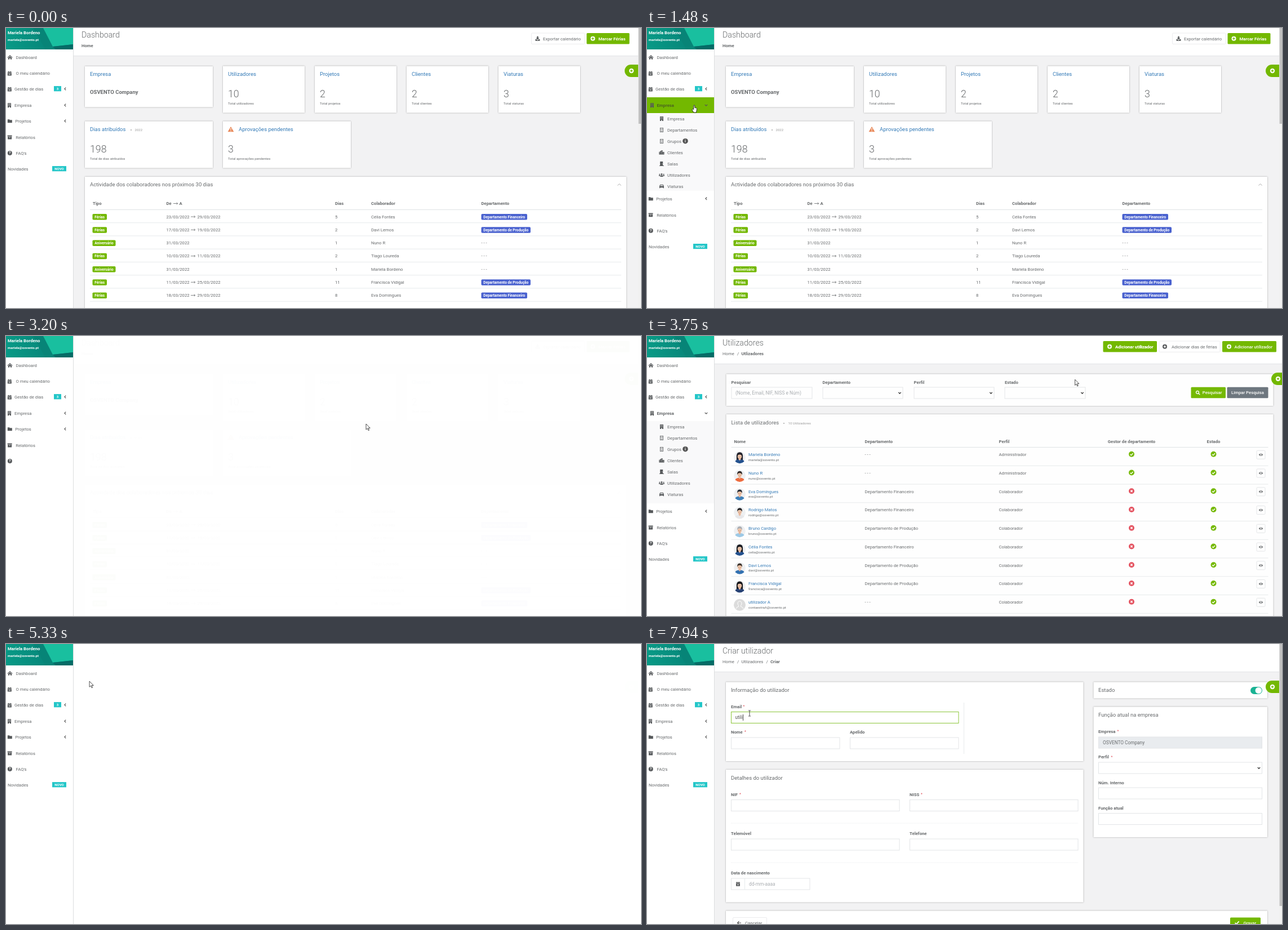
Write an HTML page that moves like this. It is 1127 by 497 pixels and loops after 8 s.

```html
<!DOCTYPE html>
<html lang="pt">
<head>
<meta charset="utf-8">
<title>Gestão de utilizadores</title>
<style>
html, body { margin: 0; width: 100%; height: 100%; overflow: hidden; background: #fff; }
svg { display: block; width: 100%; height: 100%; font-family: Roboto, Arial, sans-serif; }
.card { fill: #fff; filter: drop-shadow(0 .8px .8px rgba(0,0,0,.36)); }
</style>
</head>
<body>
<svg id="stage" viewBox="0 0 1127 497"></svg>
<script>
const GREEN = '#73b800', TEAL = '#23c6c8', BLUE = '#337ab7', GRAY = '#676a6c', LINE = '#e7eaec';
const HOVER_TEXT = '#4c6420', BG = '#f2f2f3', LOOP = 8000;

// ---- drawing helpers: text y is the middle of the capitals ----
const text = (x, y, s, o = {}) => {
  const size = o.size || 7.74;
  return `<text x="${x}" y="${y + size * .355}" font-size="${size}" fill="${o.fill || GRAY}" font-weight="${o.w || 400}" text-anchor="${o.anchor || 'start'}">${s}</text>`;
};
const bold = (x, y, s, o = {}) => text(x, y, s, { w: 700, ...o });
const head = (x, y, s, o = {}) => text(x, y, s, { size: 9.5, ...o });
const rect = (x, y, w, h, fill, extra = '') => `<rect x="${x}" y="${y}" width="${w}" height="${h}" fill="${fill}" ${extra}/>`;
const card = (x, y, x2, y2) => `<rect class="card" x="${x}" y="${y}" width="${x2 - x}" height="${y2 - y}"/>`;
const line = (x, y, x2, y2, c = LINE, w = 1, extra = '') => `<path d="M${x} ${y}L${x2} ${y2}" stroke="${c}" stroke-width="${w}" ${extra}/>`;
const stroke = (x, y, d, c, w = 1.2) => `<path transform="translate(${x} ${y})" d="${d}" fill="none" stroke="${c}" stroke-width="${w}"/>`;
const circle = (x, y, r, fill) => `<circle cx="${x}" cy="${y}" r="${r}" fill="${fill}"/>`;
const group = (id, body) => `<g id="${id}">${body}</g>`;

const ICONS = {
  home: 'M-4.6.2L0-3.9L4.6.2L4 1L0-2.6L-4 1ZM-3.1 1.1L0-1.7L3.1 1.1V3.8H.9V1.5H-.9V3.8H-3.1Z',
  cal: 'M-3.5-3H-2.3V-4H-1.1V-3H1.1V-4H2.3V-3H3.5V-1.6H-3.5ZM-3.5-1.1H3.5V3.8H-3.5ZM-1.7.8V1.8H1.7V.8Z',
  building: 'M-3-4H3V4H.8V2.2H-.8V4H-3ZM-1.8-2.9V-1.7H-.6V-2.9ZM.6-2.9V-1.7H1.8V-2.9ZM-1.8-.6V.6H-.6V-.6ZM.6-.6V.6H1.8V-.6Z',
  outline: 'M-3-4H3V4H-3ZM-2.2-3.2V3.2H2.2V-3.2ZM-1.4-2.3H-.4V-1.3H-1.4ZM.4-2.3H1.4V-1.3H.4ZM-1.4-.5H-.4V.5H-1.4ZM.4-.5H1.4V.5H.4ZM-.6 1.4H.6V3.5H-.6Z',
  folder: 'M-4-3H-.8L.2-2H4V3H-4Z',
  archive: 'M-4-3.4H4V-1.5H-4ZM-3.5-1H3.5V3.4H-3.5ZM-1.2-.2V.6H1.2V-.2Z',
  city: 'M-4.6-1.2H-2.4V-3H-.6V-4H1.6V-1H4.6V3.6H-4.6ZM-3.6.2V1.2H-2.6V.2ZM-.6-2.4V-1.4H.6V-2.4ZM-.6.2V1.2H.6V.2ZM2.5.4V1.4H3.5V.4Z',
  door: 'M-2.8-4H2.2V3H4V4H-4V3H-2.8ZM.6-.5V.6H1.4V-.5Z',
  users: 'M-1.5-1.6a1.5 1.5 0 1 0 3 0a1.5 1.5 0 1 0-3 0ZM-2.6 3V1.7Q-2.6.5-1.4.5H1.4Q2.6.5 2.6 1.7V3ZM-4.6-1.3a1 1 0 1 0 2 0a1 1 0 1 0-2 0ZM2.6-1.3a1 1 0 1 0 2 0a1 1 0 1 0-2 0ZM-5 1.7V.8Q-5 .1-4.3.1H-2.4L-3.2 1.7ZM5 1.7V.8Q5 .1 4.3.1H2.4L3.2 1.7Z',
  car: 'M-4-.2L-2.8-3H2.8L4-.2V3.3H2.6V2.2H-2.6V3.3H-4ZM-2.8-.4H2.8L2.1-2H-2.1Z',
  down: 'M-1.2-4H1.2V-1H3L0 2L-3-1H-1.2ZM-4 1.4H-2L0 3.2L2 1.4H4V4H-4Z',
  warn: 'M0-4.8L5.4 4.6H-5.4ZM-.7-1.8L-.4 1.6H.4L.7-1.8ZM-.6 2.3V3.5H.6V2.3Z',
  eye: 'M-3.7 0Q0-4.6 3.7 0Q0 4.6-3.7 0ZM-1.7 0a1.7 1.7 0 1 0 3.4 0a1.7 1.7 0 1 0-3.4 0ZM-.8 0a.8.8 0 1 0 1.6 0a.8.8 0 1 0-1.6 0Z'
};
const icon = (name, x, y, c = '#55585a') => `<path transform="translate(${x} ${y})" d="${ICONS[name]}" fill="${c}" fill-rule="evenodd"/>`;
const plus = (x, y, c, ink, r = 4) => circle(x, y, r, c) + stroke(x, y, `M${-r * .55} 0H${r * .55}M0 ${-r * .55}V${r * .55}`, ink, 1.3);
const check = (x, y) => circle(x, y, 5, GREEN) + stroke(x, y, 'M-2.5.1L-.7 1.9L2.6-1.5', '#fff', 1.4);
const cross = (x, y) => circle(x, y, 5, '#e4515f') + stroke(x, y, 'M-1.7-1.7L1.7 1.7M1.7-1.7L-1.7 1.7', '#fff', 1.4);
const left = (y, c) => stroke(105, y, 'M1.2-2.3L-1.1 0L1.2 2.3', c);
const arrow = (x, y) => stroke(x, y, 'M0 0H7.6M5.6-1.8L7.8 0L5.6 1.8', GRAY, .8);
const badge = (x, y, w, s, c) => rect(x, y - 5.4, w, 10.6, c, 'rx="1.8"') + bold(x + w / 2, y - .1, s, { size: 6.5, fill: '#fff', anchor: 'middle' });
const tag = (x, y, w, s) => rect(x, y - 4.6, w, 9.2, TEAL) + bold(x + w / 2, y, s, { size: 6.1, fill: '#fff', anchor: 'middle' });
const input = (x, y, x2, o = {}) => rect(x + .5, y + .5, x2 - x - 1, 20, o.fill || '#fff', `stroke="#e3e5e7" ${o.id ? `id="${o.id}"` : ''}`) +
  (o.select ? stroke(x2 - 6, y + 10.6, 'M-2.2-1.2L0 1.2L2.2-1.2', '#333', 1.3) : '');
const label = (x, y, s, star) => bold(x, y, s) + (star ? text(star, y - .4, '*', { size: 6.5, fill: '#e0505a' }) : '');

// ---- sidebar ----
const menuRow = (ic, ix, x, y, s) => icon(ic, ix, y) + text(x, y, s);
const SUB = [['building', 'Empresa'], ['outline', 'Departamentos'], ['outline', 'Grupos'], ['city', 'Clientes'], ['door', 'Salas'], ['users', 'Utilizadores'], ['car', 'Viaturas']];

const banner = `<defs><linearGradient id="teal" x2="1"><stop stop-color="#089a86"/><stop offset="1" stop-color="#067a72"/></linearGradient></defs>` +
  rect(0, 0, 119, 38, 'url(#teal)') +
  '<path d="M48 0H68L84 33L70 38Z" fill="#078477"/><path d="M66 0H119V29L83 33Z" fill="#19bf9f"/><path d="M83 33L119 29V38H88Z" fill="#056b66"/>' +
  bold(3, 8, 'Mariela Bordeno', { fill: '#fff' }) + bold(3, 20.5, 'mariela@osvento.pt', { size: 6.1, fill: '#fff' });

const sidebar = rect(0, 0, 119, 497, '#fff') +
  menuRow('home', 7, 17.5, 52, 'Dashboard') + menuRow('cal', 6.3, 17.5, 80.7, 'O meu calendário') +
  menuRow('cal', 6.3, 15, 108.7, 'Gestão de dias') + tag(85, 107.7, 13, '3') + left(108, '#555') +
  group('sub', rect(0, 151, 119, 146, '#f9f9fa') + rect(0, 0, 119, 20, GREEN, 'id="subHover"') +
    SUB.map(([ic, s], i) => icon(ic, 26, 161 + i * 20) + text(36, 161 + i * 20, s)).join('') +
    circle(68, 200.7, 4.8, '#555') + bold(68, 200.7, 'i', { size: 7, fill: '#fff', anchor: 'middle' })) +
  rect(0, 123, 119, 28, '#fff') + rect(0, 123, 119, 28, GREEN, 'id="rowHover"') +
  group('rowClosed', menuRow('building', 6, 15, 137.2, 'Empresa') + left(137, '#555')) +
  group('rowOpen', icon('building', 9, 137.2) + bold(17.5, 137.2, 'Empresa') + stroke(105, 137, 'M-2.3-1.2L0 1.1L2.3-1.2', '#555')) +
  group('lower', rect(0, 151, 119, 346, '#fff') + menuRow('folder', 6.8, 16.2, 165.3, 'Projetos') + left(165, '#555') +
    menuRow('archive', 6.6, 17.2, 194, 'Relatórios') + circle(6.8, 222, 4, '#55585a') + bold(6.8, 222, '?', { size: 6.5, fill: '#fff', anchor: 'middle' }) +
    group('tail', text(17.5, 222, "FAQ's") + text(3, 250.5, 'Novidades') + tag(82, 249.7, 25, 'NOVO'))) +
  banner + line(119.5, 0, 119.5, 497, '#dcdedf');

// ---- page frame ----
const crumbs = parts => parts.map(([x, s], i) => (i ? text(x - 7.5, 31.3, '/') : '') + text(x, 31.3, s, { w: i == parts.length - 1 ? 700 : 400 })).join('');
const topBar = (title, parts) => rect(120, 0, 1007, 497, BG) + rect(120, 0, 1007, 49, '#fff') + line(120, 49.5, 1127, 49.5, '#e2e4e6') +
  head(134, 11.5, title, { size: 14.2, w: 300 }) + crumbs(parts);
const plusTab = (x, end) => `<path d="M${end} 65H${x + 11}a11 11 0 0 0 0 22H${end}Z" fill="${GREEN}"/>` + plus(x + 12, 76, '#fff', GREEN, 4.2);
const scrollbar = h => rect(1122, 0, 5, 497, '#f1f1f1') + rect(1122.6, 0, 4.4, h, '#c1c1c1');
const button = (x, x2, y, s, tx, fill, ink = '#fff', w = 500) => rect(x, y, x2 - x, 19.5, fill, `rx="1.5" ${fill == '#fff' ? 'stroke="#ececee"' : ''}`) + text(tx, y + 9.8, s, { fill: ink, w });

// ---- dashboard ----
const counter = (x, y, x2, title, n, sub, tx = x + 9) => card(x, y, x2, y + 83) + head(tx, y + 14.3, title, { fill: BLUE }) +
  text(x + 9, y + 49, n, { size: 17.8, w: 300 }) + text(x + 9, y + 66, sub, { size: 6 });
const EVENTS = [
  ['Férias', '23/03/2022', '29/03/2022', 5, 'Célia Fontes', 'Financeiro'],
  ['Férias', '17/03/2022', '19/03/2022', 2, 'Davi Lemos', 'de Produção'],
  ['Aniversário', '31/03/2022', '', 1, 'Nuno R'],
  ['Férias', '10/03/2022', '11/03/2022', 2, 'Tiago Loureda'],
  ['Aniversário', '31/03/2022', '', 1, 'Mariela Bordeno'],
  ['Férias', '11/03/2022', '25/03/2022', 11, 'Francisca Vidigal', 'de Produção'],
  ['Férias', '18/03/2022', '29/03/2022', 8, 'Eva Domingues', 'Financeiro']
];
const eventRow = ([type, from, to, days, who, dept], i) => {
  const y = 335 + i * 23.25;
  return badge(153.5, y + .4, type == 'Férias' ? 25.5 : 41, type, GREEN) + text(284.5, y, from) +
    (to ? arrow(328, y) + text(339.5, y, to) : '') + text(584, y, days) + text(648, y, who) +
    (dept ? badge(843.5, y + .4, dept == 'Financeiro' ? 81.5 : 87.5, 'Departamento ' + dept, '#4a62cf') : text(843.5, y, '- - -')) +
    line(149, y + 10.7, 1092, y + 10.7);
};
const dashboard = topBar('Dashboard', [[134, 'Home']]) +
  button(932.5, 1027, 9, 'Exportar calendário', 953, '#fff', GRAY, 400) + icon('down', 943.5, 18.7) +
  button(1030.5, 1106.5, 9, 'Marcar Férias', 1051.5, GREEN, '#fff', 700) + plus(1041.5, 18.7, '#fff', GREEN) +
  card(140, 68, 367, 140.5) + head(149, 82, 'Empresa', { fill: BLUE }) + head(149, 114, 'OSVENTO Company', { w: 700 }) +
  counter(385, 67.5, 530, 'Utilizadores', 10, 'Total utilizadores') + counter(548, 67.5, 693, 'Projetos', 2, 'Total projetos') +
  counter(711, 67.5, 856, 'Clientes', 2, 'Total clientes') + counter(874, 67.5, 1019, 'Viaturas', 3, 'Total viaturas') +
  counter(140, 165.5, 367, 'Dias atribuídos', 198, 'Total de dias atribuídos') + circle(222, 181, .9, '#999') + text(228.5, 181, '2022', { size: 6.1, fill: '#999' }) +
  counter(385, 165.5, 612, 'Aprovações pendentes', 3, 'Total aprovações pendentes', 413) + icon('warn', 399, 179.7, '#e8895a') +
  card(140, 264, 1101, 510) + head(149, 278, 'Actividade dos colaboradores nos próximos 30 dias') + stroke(1088.5, 278, 'M-3 1.6L0-1.4L3 1.6', '#aaa', 1) +
  bold(154, 311.5, 'Tipo') + bold(284.5, 311.5, 'De') + arrow(297, 311.5) + bold(307.5, 311.5, 'A') + bold(584, 311.5, 'Dias') +
  bold(648, 311.5, 'Colaborador') + bold(843.5, 311.5, 'Departamento') + line(149, 322.5, 1092, 322.5, '#dfe2e4') +
  EVENTS.map(eventRow).join('') + plusTab(1098, 1122) + scrollbar(170);

// ---- user list: name, mailbox, department, hair, shirt, long hair ----
const USERS = [
  ['Mariela Bordeno', 'mariela', '', '#20202a', '#1f4e8c', 1],
  ['Nuno R', 'nuno', '', '#2b2422', '#ee6a3c', 0],
  ['Eva Domingues', 'eva', 'Financeiro', '#262a33', '#3d7fb8', 0],
  ['Rodrigo Matos', 'rodrigo', 'Financeiro', '#1f1f22', '#e8e8ea', 0],
  ['Bruno Cardigo', 'bruno', 'de Produção', '#a9adb3', '#9cc9e6', 0],
  ['Célia Fontes', 'celia', 'Financeiro', '#17191f', '#1f4e8c', 1],
  ['Davi Lemos', 'davi', 'de Produção', '#3a3029', '#2f6fb0', 0],
  ['Francisca Vidigal', 'francisca', 'de Produção', '#16161a', '#233f73', 1],
  ['utilizador A', 'contaextraA', '']
];
const avatar = (hair, shirt, long) => hair
  ? circle(0, 0, 10.3, '#eef0f2') + (long ? `<path d="M-5.6 5V-3Q-5-9 0-9T5.6-3V5Z" fill="${hair}"/>` : '') +
    `<path d="M-8 7.5Q-7 4-2 3.6H2Q7 4 8 7.5Q4 11 0 11T-8 7.5Z" fill="${shirt}"/><path d="M-1.8 1H1.8V4L0 6L-1.8 4Z" fill="#e9b698"/>` +
    `<ellipse cy="-1.6" rx="3.7" ry="4.6" fill="#f3c8ab"/><path d="M-4.4-1.5Q-5-8.2 0-8.4T4.4-1.5Q3.4-4.8 0-4.9T-4.4-1.5Z" fill="${hair}"/>` +
    circle(-1.5, -1.4, .5, '#333') + circle(1.5, -1.4, .5, '#333') + stroke(0, 0, 'M-1.1 1.2Q0 1.9 1.1 1.2', '#a55', .6)
  : circle(0, 0, 10.5, '#dcdcdc') + stroke(0, 0, 'M-6.5 7Q-6 3.6-2 3V1.3Q-4-1-3.4-4Q-2.6-6.6 0-6.6T3.4-4Q4-1 2 1.3V3Q6 3.6 6.5 7', '#fff', 1);
const userRow = ([name, mail, dept, hair, shirt, long], i) => {
  const y = 210.3 + i * 32.75, admin = i < 2;
  return `<g transform="translate(164 ${y + 5})">${avatar(hair, shirt, long)}</g>` + text(179.5, y, name, { fill: BLUE }) +
    text(179.5, y + 9.3, mail + '@osvento.pt', { size: 6.1 }) + text(386, y, dept ? 'Departamento ' + dept : '- - -') +
    text(624, y, admin ? 'Administrador' : 'Colaborador') + (admin ? check : cross)(859.5, y - .5) + check(1005, y - .5) +
    rect(1081.5, y - 7, 15, 15, '#fff', 'rx="1.5" stroke="#e3e5e7"') + icon('eye', 1089, y + .5) + line(149, y + 20, 1102, y + 20);
};
const list = topBar('Utilizadores', [[134, 'Home'], [167.5, 'Utlizadores']]) +
  button(809.5, 905, 9, 'Adicionar utilizador', 831, GREEN) + rect(809.5, 9, 95.5, 19.5, '#a8ff24', 'rx="1.5" id="glow"') +
  text(831, 18.8, 'Adicionar utilizador', { fill: '#fff', w: 500 }) + plus(821, 18.8, '#fff', GREEN) +
  button(909, 1017, 9, 'Adicionar dias de férias', 931, '#fff', GRAY, 400) + plus(919, 18.8, '#55585a', '#fff') +
  button(1021, 1117, 9, 'Adicionar utilizador', 1042.5, GREEN) + plus(1033, 18.8, '#fff', GREEN) +
  group('listBody', card(140, 67.5, 1111, 124) + label(149, 82, 'Pesquisar') + label(311, 82, 'Departamento') + label(473, 82, 'Perfil') + label(634.5, 82, 'Estado') +
    input(149, 90.5, 293) + text(156.5, 101, '(Nome, Email, NIF, NISS e Núm)', { size: 8.4, fill: '#a9adb1' }) +
    [[311, 454], [473, 616], [634, 778]].map(([a, b]) => input(a, 90.5, b, { select: 1 })).join('') +
    button(965, 1026.5, 90.8, 'Pesquisar', 985.3, GREEN) + stroke(977, 100, 'M2 0A2.5 2.5 0 1 1 2-.01M1.3 1.8L3.8 4.2', '#fff', 1.4) +
    button(1029, 1102, 90.8, 'Limpar Pesquisa', 1036.5, '#6c757d') +
    card(140, 139, 1111, 510) + head(149, 154, 'Lista de utilizadores') + circle(242.5, 155, .9, '#999') + text(250, 155, '10 Utilizadores', { size: 6.1, fill: '#999' }) +
    bold(154, 187, 'Nome') + bold(386, 187, 'Departamento') + bold(624, 187, 'Perfil') +
    bold(859.5, 187, 'Gestor de departamento', { anchor: 'middle' }) + bold(1005, 187, 'Estado', { anchor: 'middle' }) +
    line(149, 197.6, 1102, 197.6, '#dfe2e4') + USERS.map(userRow).join('')) + plusTab(1108, 1127);

// ---- new user form ----
const dashes = y => line(149, y, 765, y, LINE, .8, 'stroke-dasharray="1.5 1"');
const form = topBar('Criar utilizador', [[134, 'Home'], [167.5, 'Utlizadores'], [219, 'Criar']]) +
  group('formBody', card(140, 67.5, 774.5, 208) + head(149, 82, 'Informação do utilizador') + label(149, 111.3, 'Email', 170.5) +
    input(149, 120, 553.5, { id: 'email' }) + label(149, 156.5, 'Nome', 173) + input(149, 165.5, 342.5) +
    label(360, 156.5, 'Apelido') + input(360, 165.5, 553.5) + line(562.5, 104, 562.5, 195) +
    card(140, 223, 774.5, 458.5) + head(149, 237.5, 'Detalhes do utilizador') +
    label(149, 267, 'NIF', 164) + input(149, 276, 448.5) + label(466, 267, 'NISS', 486) + input(466, 276, 765.5) + dashes(318) +
    label(149, 336.7, 'Telemóvel') + input(149, 345.5, 448.5) + label(466, 336.7, 'Telefone') + input(466, 345.5, 765.5) + dashes(388) +
    label(149, 406.5, 'Data de nascimento') + input(149, 415.5, 289.5) + line(173.5, 416, 173.5, 436) + icon('cal', 161.5, 426) +
    text(181, 426, 'dd-mm-aaaa', { size: 8.3, fill: '#a9adb1' }) +
    card(792.5, 67.5, 1101, 96.5) + head(801, 82, 'Estado') + rect(1071, 76, 21, 13, '#1ab394', 'rx="6.5"') + circle(1085.3, 82.5, 5.7, '#fff') +
    card(792.5, 111.5, 1101, 343) + head(801, 126, 'Função atual na empresa') + label(801, 155.5, 'Empresa', 834.5) +
    input(801, 164.5, 1092, { fill: '#e9ecef' }) + text(809, 175, 'OSVENTO Company', { size: 8.3 }) +
    label(801, 200.7, 'Perfil', 823.5) + input(801, 209.5, 1092, { select: 1 }) + label(801, 246, 'Núm. Interno') + input(801, 254.5, 1092) +
    label(801, 291.3, 'Função atual') + input(801, 300, 1092) +
    card(140, 473.5, 1101, 520) + button(152.5, 212.5, 485.5, 'Cancelar', 174, '#fff', GRAY, 400) + stroke(163.5, 495, 'M3.5 0H-3M0-3L-3 0L0 3', '#555', 1.1) +
    button(1035, 1089, 485.5, 'Gravar', 1058.5, GREEN) + stroke(1047, 494.8, 'M-3.4 0L-1 2.5L3.6-2.4', '#fff', 1.7) +
    `<text id="typed" x="156.5" y="133" font-size="8.3" fill="#555"></text>` + rect(0, 125, .9, 11, '#333', 'id="caret"')) +
  plusTab(1098, 1122) + scrollbar(465);

const CURSORS = {
  pointer: '<path d="M0 0V10.2L2.4 8L4.1 11.8L5.6 11.1L4 7.4H7.2Z" fill="#fff" stroke="#222" stroke-width=".8"/>',
  hand: '<path d="M-1.2 7.6V1Q-1.2 0-.2 0T.8 1V4.4L3.6 5Q4.6 5.3 4.5 6.4L4 10.2L3.4 13H-1.2L-3.8 8.6Q-4.2 7.2-2.8 6.8Z" fill="#fff" stroke="#222" stroke-width=".9"/>',
  beam: '<path d="M-2-5H-.6L0-4.5L.6-5H2M0-4.5V4.5M-2 5H-.6L0 4.5L.6 5H2" fill="none" stroke="#333" stroke-width=".9"/>'
};
const stage = document.getElementById('stage');
stage.innerHTML = group('dash', dashboard) + group('list', list) + group('form', form) + sidebar +
  group('cursor', Object.entries(CURSORS).map(([k, v]) => group(k, v)).join(''));
const el = {};
stage.querySelectorAll('[id]').forEach(n => el[n.id] = n);

// ---- motion ----
const PATH = [
  [130, 1085, 400], [210, 900, 352], [370, 400, 222], [530, 98, 143], [610, 84, 137], [1500, 84, 137], [1870, 82, 233], [1960, 82, 239],
  [2039, 82, 240], [2040, 82, 254], [2280, 82, 256], [2490, 82, 259], [2890, 82, 259], [3200, 639, 156], [3360, 639, 156],
  [4070, 858, 13], [4770, 858, 13], [4780, 500, 42], [4850, 148, 66], [5330, 148, 66], [5880, 180, 114.5], [6110, 182, 123]
];
const OPEN = [[1160, 0], [1500, 1]];
const FADES = {
  dash: [[2880, 1], [2890, .75], [3200, .012], [3359, .012], [3360, 0]],
  list: [[3360, 0], [3600, 1], [4850, 1], [4939, 1], [4940, .3], [5030, .012], [5329, .012], [5330, 0]],
  form: [[5330, 0], [5570, 1]]
};
const KEYS = [6970, 7220, 7390, 7630, 7940];

const at = (table, t, k = 1) => {
  const i = table.findIndex(p => p[0] > t);
  if (i < 0) return table[table.length - 1][k];
  if (!i) return table[0][k];
  const a = table[i - 1], b = table[i];
  return a[k] + (b[k] - a[k]) * (t - a[0]) / (b[0] - a[0]);
};
const ramp = (t, a, b) => Math.min(1, Math.max(0, (t - a) / (b - a)));
const show = (node, on) => node.style.display = on ? '' : 'none';
const enter = (node, t, a, b) => {
  const p = 1 - (1 - ramp(t, a, b)) ** 3;
  node.setAttribute('transform', `translate(${24 * (1 - p)} 0)`);
  node.style.opacity = p;
};

function draw(t) {
  for (const id in FADES) {
    const o = at(FADES[id], t);
    show(el[id], o > 0);
    el[id].style.opacity = o;
  }
  enter(el.listBody, t, 3360, 3900);
  enter(el.formBody, t, 5330, 5800);
  el.glow.style.opacity = ramp(t, 4300, 4550);

  // sidebar
  const x = at(PATH, t), y = at(PATH, t, 2);
  const expanded = (t >= 1160 && t < 2970) || (t >= 3360 && t < 4940);
  const loading = (t >= 2970 && t < 3360) || (t >= 4940 && t < 5330);
  const overMenu = t >= 130 && x < 119;
  const item = Math.floor((y - 151) / 20);
  show(el.sub, expanded);
  show(el.rowOpen, expanded);
  show(el.rowClosed, !expanded);
  show(el.tail, !loading);
  el.lower.setAttribute('transform', `translate(0 ${expanded ? 146 * at(OPEN, t) : 0})`);
  const focus = t >= 1160 && t < 2490 ? 1 - ramp(t, 2280, 2490) : overMenu && t < 1160 ? 1 : 0;
  el.rowHover.style.opacity = focus;
  for (const row of [el.rowOpen, el.rowClosed])
    row.querySelector('text').setAttribute('fill', focus > .5 ? HOVER_TEXT : GRAY);
  const subOn = overMenu && expanded && t < 2970 && item >= 0 && item < SUB.length;
  show(el.subHover, subOn);
  if (subOn) el.subHover.setAttribute('y', 151 + item * 20);
  el.sub.querySelectorAll('text').forEach((n, i) => i < SUB.length && n.setAttribute('fill', subOn && i == item ? HOVER_TEXT : GRAY));

  // e-mail field
  const n = KEYS.filter(k => k <= t).length;
  el.typed.textContent = 'utili'.slice(0, n);
  el.caret.setAttribute('x', 156.4 + (n ? el.typed.getComputedTextLength() + .4 : 0));
  show(el.caret, (t >= 6270 && t < 6670) || t >= 6970);
  el.email.setAttribute('stroke', t < 6190 ? '#e3e5e7' : t < 6350 ? '#b5d47c' : '#8cc63a');

  // mouse
  const kind = t >= 6110 ? 'beam' : overMenu && t < 2970 || t >= 3990 && t < 4780 ? 'hand' : 'pointer';
  for (const k in CURSORS) show(el[k], k == kind);
  show(el.cursor, t >= 130);
  el.cursor.setAttribute('transform', `translate(${x} ${y})`);
}

const start = performance.now();
function tick() {
  draw((performance.now() - start) % LOOP);
  requestAnimationFrame(tick);
}
tick();
</script>
</body>
</html>
```
